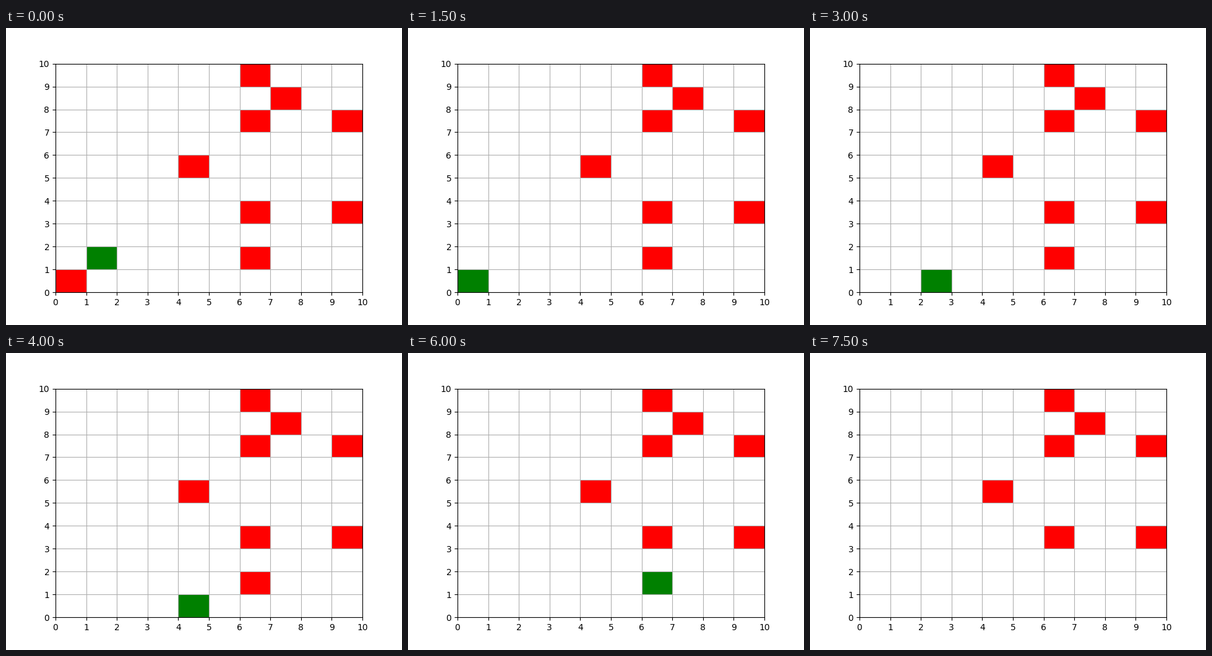
A matplotlib script that plays this animation: 640x480 px, repeating every 8 s.

```python
import matplotlib.pyplot as plt
from matplotlib.animation import FuncAnimation
from matplotlib.patches import Rectangle

SIZE = 10
STEP_MS = 500
DIRT = [(0, 0), (6, 1), (6, 3), (9, 3), (4, 5), (6, 7), (9, 7), (7, 8), (6, 9)]
CORNERS = [(1, 1), (0, 1), (0, 0), (6, 0), (6, 3)]
STEPS = 16


def walk(corners):
    """Cells from corner to corner along straight lines, one at a time."""
    x, y = corners[0]
    yield x, y
    for cx, cy in corners[1:]:
        while (x, y) != (cx, cy):
            x += (cx > x) - (cx < x)
            y += (cy > y) - (cy < y)
            yield x, y


# A dirty cell takes three steps: arrive below the dirt, clean, rest.
path = [cell for cell in walk(CORNERS)
        for _ in range(3 if cell in DIRT else 1)][:STEPS]

fig, ax = plt.subplots(figsize=(6.4, 4.8), dpi=100)
ax.set(xlim=(0, SIZE), ylim=(0, SIZE),
       xticks=range(SIZE + 1), yticks=range(SIZE + 1))
ax.grid(True)


def add_cell(cell, color, zorder):
    return ax.add_patch(Rectangle(cell, 1, 1, facecolor=color, zorder=zorder))


robot = add_cell(path[0], "green", 0.9)
dirt = {cell: add_cell(cell, "red", 1) for cell in DIRT}


def update(i):
    robot.set_xy(path[i])
    for cell, patch in dirt.items():
        patch.set_visible(cell not in path[:i])
    return [robot, *dirt.values()]


anim = FuncAnimation(fig, update, frames=STEPS, interval=STEP_MS,
                     repeat=True, repeat_delay=0, blit=False)
plt.show()
```
